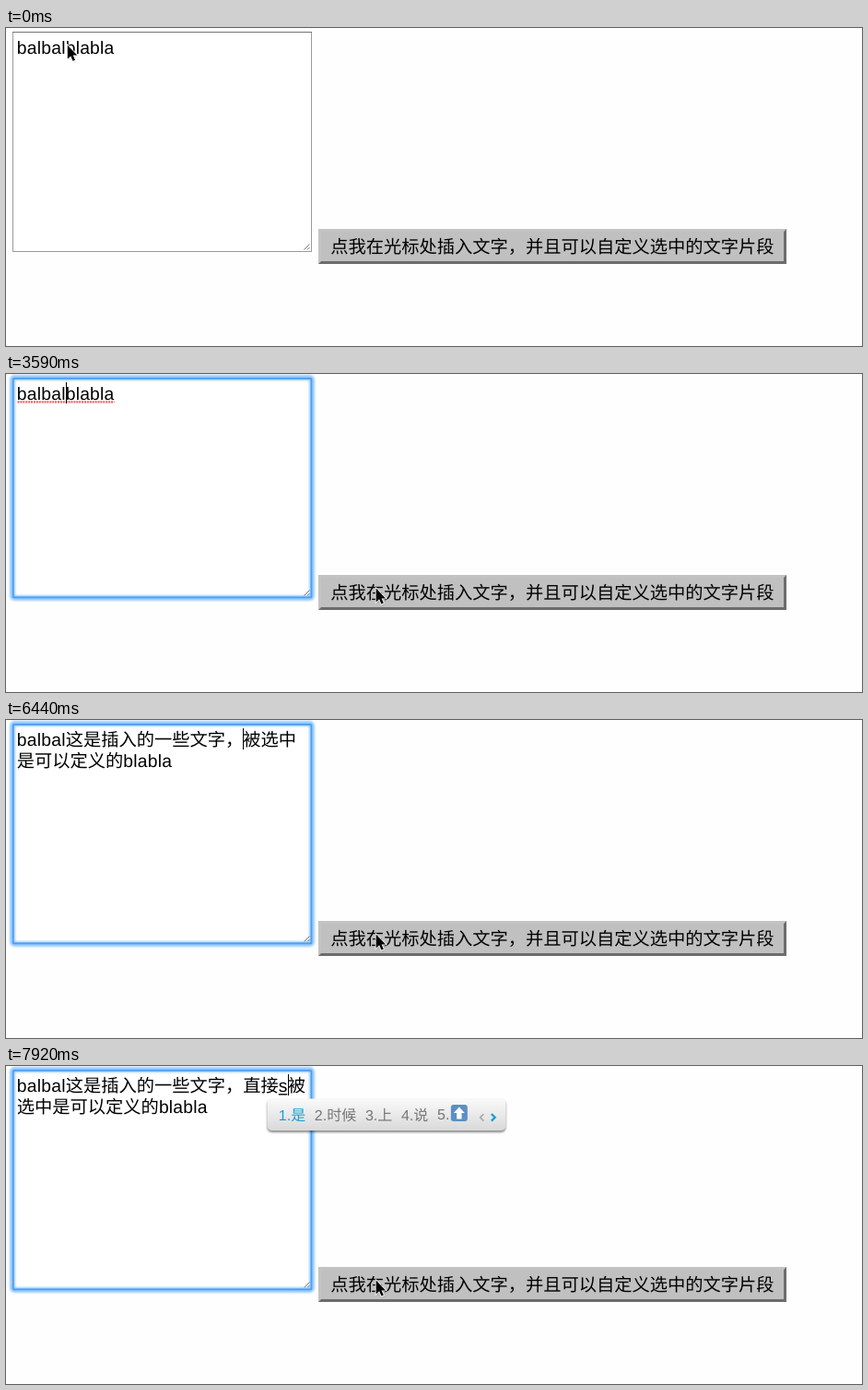
Animation, 929 px wide and 345 px high, one loop 8000 ms. Source, as an HTML page:

```html
<!DOCTYPE html>
<html lang="zh-CN">
<head>
<meta charset="utf-8">
<title>Insert text at the caret</title>
<style>
html, body { margin: 0; width: 100%; height: 100%; overflow: hidden; background: #fefefe; }
svg { display: block; width: 929px; height: 345px; }
text { font-family: "Liberation Sans", Arial, "Noto Sans CJK SC", "Noto Sans CJK", sans-serif; text-rendering: geometricPrecision; white-space: pre; }
.cjk { font-family: "Noto Sans CJK SC", "Noto Sans CJK", "Noto Sans CJK JP", sans-serif; }
.body { font-size: 19.26px; }
.latin { letter-spacing: .25px; }
.item { font-size: 16px; }
</style>
</head>
<body>
<svg viewBox="0 0 929 345" xmlns="http://www.w3.org/2000/svg">
  <defs>
    <linearGradient id="bar" x2="0" y2="1">
      <stop offset="0" stop-color="#fafafa"/>
      <stop offset="1" stop-color="#d9d9d9"/>
    </linearGradient>
    <filter id="soft" x="-5%" y="-30%" width="110%" height="160%"><feGaussianBlur stdDeviation="1.3"/></filter>
    <filter id="ring" x="-5%" y="-30%" width="110%" height="160%"><feGaussianBlur stdDeviation=".8"/></filter>
  </defs>
  <g id="stage"></g>
</svg>
<script>
const LOOP = 8000, SIZE = 19.26, LEFT = 11.8, LIMIT = 327, LINE = 23;
const stage = document.getElementById('stage');
const pen = document.createElement('canvas').getContext('2d');
pen.font = '100px "Liberation Sans", Arial, sans-serif';

// Each list holds [start time, ...values]; the last started entry applies.
const pointer = [
  [0, 'arrow', 66.8, 18.8], [150, 'beam', 61.8, 29], [1050, 'beam', 69, 21],
  [1350, 'beam', 62.8, 21], [1950, 'beam', 152, 72], [2100, 'beam', 256, 123.5],
  [2400, 'beam', 283.5, 141], [2550, 'beam', 296, 160], [2700, 'beam', 319, 187],
  [2850, 'arrow', 350, 208], [3000, 'arrow', 376, 222], [3140, 'arrow', 394, 230],
  [3290, 'arrow', 401.6, 232.6]
];
const focus = [[0, ''], [1650, 'area'], [4040, 'button'], [5540, 'area']];
const caret = [
  [0, 0], [1650, 1], [2100, 0], [2700, 1], [3140, 0], [3590, 1],
  [4040, 0], [5540, 1], [5990, 0], [6440, 1]
];
const HEAD = 'balbal这是插入的一些文字，', TAIL = '被选中是可以定义的blabla';
// start, text before, middle, text after, look of the middle
const content = [
  [0, 'balbal', '', 'blabla', ''],
  [4190, HEAD, '[这里]', TAIL, 'selected'],
  [5540, HEAD, 'z', TAIL, ''],
  [6440, HEAD, '', TAIL, ''],
  [6890, HEAD, 'z', TAIL, 'composing'],
  [7040, HEAD, 'zh', TAIL, 'composing'],
  [7180, HEAD, 'zhi', TAIL, 'composing'],
  [7330, HEAD, 'zhij', TAIL, 'composing'],
  [7480, HEAD, 'zhijie', TAIL, 'composing'],
  [7630, HEAD + '直接', '', TAIL, ''],
  [7920, HEAD + '直接', 's', TAIL, 'composing']
];
const choices = {
  z: '在 做 再 则 怎', zh: '中 这 之 只 着', zhi: '只 之 值 至 @green',
  zhij: '直接 之间 指教 直径 直觉', zhijie: '直接 枝节 职介 指节 直截',
  s: '是 时候 上 说 @up'
};

const pick = (list, t) => list.filter(e => e[0] <= t).pop().slice(1);
const isCjk = c => c > '\u2e80';
const em = s => pen.measureText(s).width / 100;
const advance = c => isCjk(c) ? SIZE : em(c) * SIZE + .25;
const rect = (x, y, w, h, attrs) => `<rect x="${x}" y="${y}" width="${w}" height="${h}" ${attrs}/>`;
const path = (d, attrs) => `<path d="${d}" ${attrs}/>`;
const label = (x, y, s, cls, fill = '#000') =>
  `<text x="${x.toFixed(2)}" y="${y}" class="${cls}" fill="${fill}">${s}</text>`;

// Places every character, wrapping at the right edge of the field.
function place(text) {
  let x = LEFT, row = 0;
  return [...text].map(c => {
    const w = advance(c);
    if (x + w > LIMIT) { x = LEFT; row++; }
    const spot = { c, x, row, end: x + w };
    x += w;
    return spot;
  });
}

function drawRuns(spots) {
  const runs = [];
  for (const s of spots) {
    const last = runs[runs.length - 1];
    if (last && last.row === s.row && last.cjk === isCjk(s.c)) last.text += s.c;
    else runs.push({ text: s.c, x: s.x, row: s.row, cjk: isCjk(s.c) });
  }
  return runs.map(r => label(r.x, 28 + r.row * LINE, r.text, 'body ' + (r.cjk ? 'cjk' : 'latin'))).join('');
}

function drawField(focused) {
  const edge = focused
    ? rect(7, 4, 325, 239, 'rx="2" fill="none" stroke="#8cc6ff" stroke-width="5.5" filter="url(#ring)"') +
      rect(7.8, 4.8, 323.6, 237.6, 'rx="1" fill="none" stroke="#4f9ef2" stroke-width="1.7"')
    : rect(7.5, 4.5, 324, 238, 'fill="none" stroke="#9a9a9a"') +
      path('M7 4.5H332', 'stroke="#747474"');
  return rect(7, 4, 325, 239, 'fill="#fff"') + edge +
    path('M323.5 240.5L329.5 234.5M327 240.5L329.5 238', 'stroke="#777" stroke-width="1"');
}

function drawButton(focused, pressed) {
  const dark = '#6c6c6c', light = '#c3c3c3';
  const [a, b] = pressed ? [dark, light] : [light, dark];
  const glow = focused
    ? rect(337, 216, 512, 42, 'rx="3" fill="none" stroke="#a9d5ff" stroke-width="6.5" filter="url(#ring)"') +
      rect(337.2, 216.2, 511.6, 41.6, 'rx="3" fill="none" stroke="#78b8fa" stroke-width="3.6"')
    : '';
  return glow + rect(339, 218, 508, 38, 'fill="#c0c0c0"') +
    path('M339 256V218H847L844 221H342V253Z', `fill="${a}"`) +
    path('M847 218V256H339L342 253H844V221Z', `fill="${b}"`) +
    label(352.3, 244, '点我在光标处插入文字，并且可以自定义选中的文字片段', 'body cjk');
}

function drawIcon(kind, x) {
  if (kind === '@green') {
    return rect(x, 42, 18, 18, 'rx="3" fill="#17a22c"') +
      `<text x="${x + 9}" y="56" class="cjk" font-size="13" font-weight="700" text-anchor="middle" fill="#fff">指</text>`;
  }
  return rect(x, 42, 18, 18, 'rx="3" fill="#5c8fc4"') +
    path(`M${x + 9} 44.5l6 6.5h-3.3v6.5h-5.4v-6.5h-3.3z`, 'fill="#fff"');
}

function drawChoices(start, names) {
  let x = start, items = '';
  names.split(' ').forEach((name, i) => {
    if (i) x += 9.7;
    const num = `${i + 1}.`, ink = i ? '#777' : '#189fd6', icon = name[0] === '@';
    items += label(x, icon ? 58 : 59, num, 'item', ink);
    x += em(num) * 16 + (icon ? 1.5 : 0);
    items += icon ? drawIcon(name, x) : label(x, 59, name, 'item cjk', ink);
    x += icon ? 18 : name.length * 16;
  });
  const left = start - 12.3, wide = x + 41.5 - left;
  return rect(left, 37, wide, 35, 'rx="5" fill="#000" opacity=".45" filter="url(#soft)"') +
    rect(left, 35.5, wide, 34.5, 'rx="5" fill="url(#bar)"') + items +
    path(`M${x + 17.5} 52l-3.6 3.8l3.6 3.8`, 'fill="none" stroke="#aaa" stroke-width="1.8"') +
    path(`M${x + 26} 52l3.8 3.8l-3.8 3.8`, 'fill="none" stroke="#189fd6" stroke-width="2.3"');
}

function drawPointer(kind, x, y) {
  if (kind === 'arrow') {
    const d = 'M0 0V14.8L3.5 11.6L5.8 17L8.2 16L5.9 10.8H10.5Z';
    return `<g transform="translate(${x} ${y})">` +
      path(d, 'transform="translate(.5 1)" opacity=".3" filter="url(#ring)"') +
      path(d, 'stroke="#fff" stroke-width="1.7" paint-order="stroke"') + '</g>';
  }
  const d = 'M-3.5 -7.5H-2Q0 -7.5 0 -5.5V5.5Q0 7.5 -2 7.5H-3.5M3.5 -7.5H2Q0 -7.5 0 -5.5M0 5.5Q0 7.5 2 7.5H3.5M-2 3H2';
  return `<g transform="translate(${x} ${y})" fill="none">` +
    path(d, 'stroke="#fff" stroke-width="2.6" opacity=".7"') +
    path(d, 'stroke="#222" stroke-width="1.2"') + '</g>';
}

function scene(t) {
  const [focused] = pick(focus, t), [before, mid, after, look] = pick(content, t);
  const spots = place(before + mid + after);
  const from = spots[before.length - 1].end;
  const to = spots[before.length + mid.length - 1].end;
  let out = drawField(focused === 'area') +
    drawButton(focused === 'button', t >= 4040 && t < 4190);
  if (look === 'selected') out += rect(from, 9, to - from, LINE, 'fill="#b2d7fd"');
  out += drawRuns(spots);
  if (t >= 1650 && t < 4190) {
    out += path('M12.5 30.3H117.5', 'stroke="#f4605c" stroke-width="2.2" stroke-dasharray="2 .9"');
  }
  if (look === 'composing') out += path(`M${from} 30.8H${to - .5}`, 'stroke="#000" stroke-width="1.4"');
  if (pick(caret, t)[0]) out += rect(Math.round(to), 9, 1, LINE, 'fill="#000"');
  if (look === 'composing') out += drawChoices(from, choices[mid]);
  return out + drawPointer(...pick(pointer, t));
}

const began = performance.now();
let shown = '';
function tick() {
  const next = scene((performance.now() - began) % LOOP);
  if (next !== shown) stage.innerHTML = shown = next;
  requestAnimationFrame(tick);
}
tick();
</script>
</body>
</html>
```
